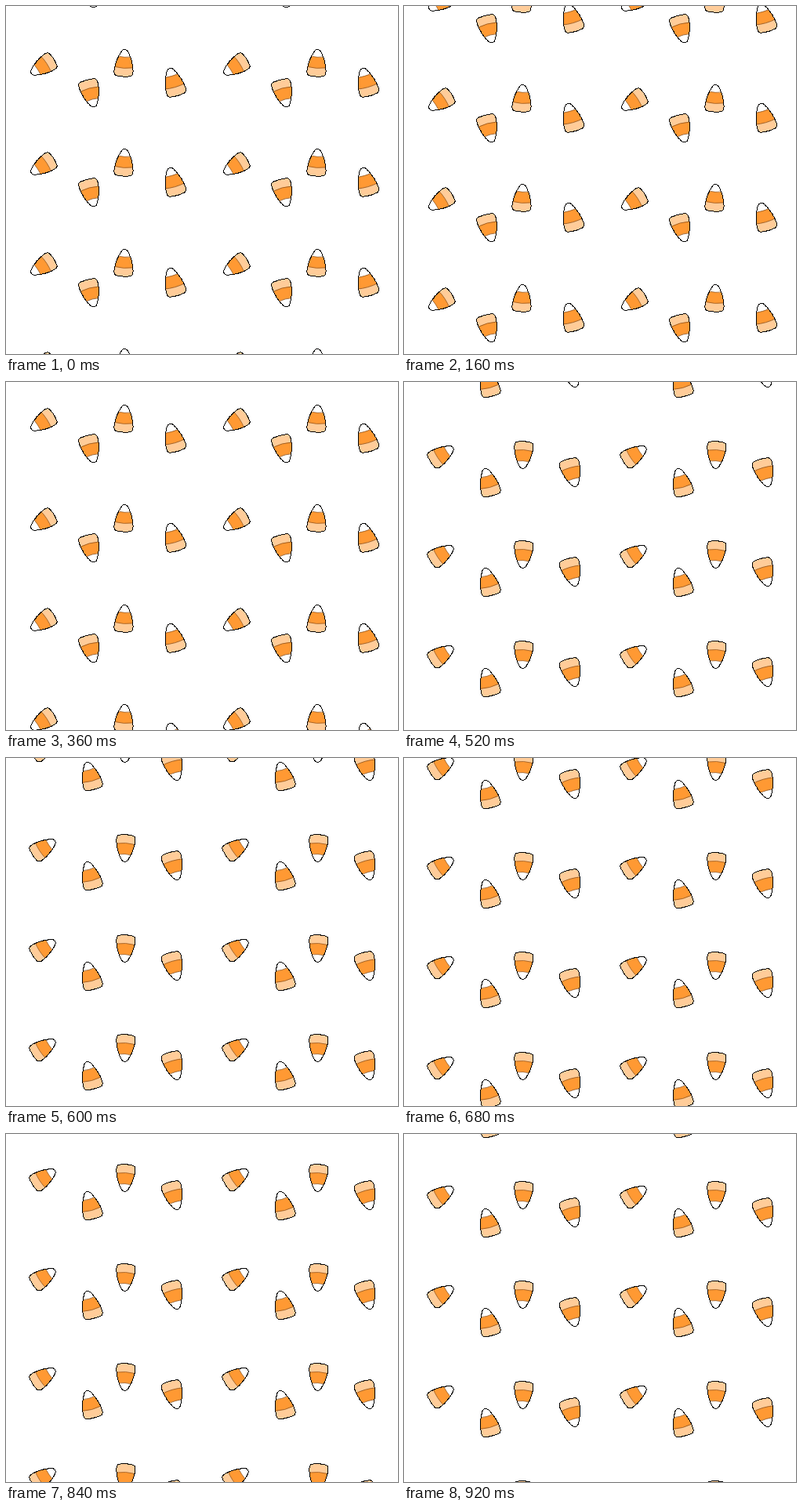
Recreate the animation shown at these times as an HTML page with a canvas. Size 500 by 444 pixels, loop 0.96 s.

```html
<!DOCTYPE html>
<html lang="en">
<head>
<meta charset="utf-8">
<title>Falling candy corn</title>
<style>
html, body { margin: 0; width: 100%; height: 100%; overflow: hidden; background: #fff; }
canvas { display: block; }
</style>
</head>
<body>
<canvas id="stage" width="500" height="444"></canvas>
<script>
const ctx = document.getElementById("stage").getContext("2d");
const WIDTH = 500, HEIGHT = 444;
const STEP_MS = 40, STEPS = 24, FLIP_STEP = 12;
const FALL = 11.25, TILE_X = 246, TILE_Y = 382 / 3;

// Each candy has an upright pose and a slightly displaced half-turned one.
const candies = [
  { x: 46.9, y: 76.7, turn: -123, scale: 0.98, dx: 1.1, dy: -2.6 },
  { x: 107.9, y: 111.1, turn: 165, scale: 1.03, dx: 0, dy: -1.8 },
  { x: 150.6, y: 73.2, turn: 3.5, scale: 1, dx: 1.7, dy: 0.5 },
  { x: 213.8, y: 97.4, turn: -16, scale: 1.05, dx: 0.1, dy: -0.9 }
];

const outline =
  "M-5-13.5C-3-19 3-19 5-13.5C8.8-7 11.3 1 12 9" +
  "C12.3 14 11 15.8 8 16.2Q0 17.6-8 16.2" +
  "C-11 15.8-12.3 14-12 9C-11.3 1-8.8-7-5-13.5Z";
const body = new Path2D(outline);
const rim = samplePath(outline, 0.8);

const bandEdge = y => `M-14 ${y - 1}Q0 ${y + 2} 14 ${y - 1}`;
const band = (y, color) => ({
  color,
  area: new Path2D(bandEdge(y) + "V-22H-14Z"),
  edge: new Path2D(bandEdge(y))
});
const bands = [band(5.7, "#ff9933"), band(-8.4, "#ffffff")];

function samplePath(d, spacing) {
  const path = document.createElementNS("http://www.w3.org/2000/svg", "path");
  path.setAttribute("d", d);
  const count = Math.ceil(path.getTotalLength() / spacing);
  return Array.from({ length: count }, (_, i) => path.getPointAtLength(i * spacing));
}

// Crisp one-pixel outline without smoothing.
function drawRim(x, y, angle, scale) {
  const cos = Math.cos(angle) * scale, sin = Math.sin(angle) * scale;
  ctx.fillStyle = "#000";
  for (const p of rim) {
    const px = Math.floor(x + p.x * cos - p.y * sin);
    const py = Math.floor(y + p.x * sin + p.y * cos);
    ctx.fillRect(px, py, 1, 1);
  }
}

function drawCandy(x, y, turn, scale) {
  const angle = turn * Math.PI / 180;
  ctx.save();
  ctx.translate(x, y);
  ctx.rotate(angle);
  ctx.scale(scale, scale);
  ctx.fillStyle = "#ffcc99";
  ctx.fill(body);
  ctx.clip(body);
  ctx.lineWidth = 0.7;
  ctx.strokeStyle = "#8a4f1a";
  for (const { color, area, edge } of bands) {
    ctx.fillStyle = color;
    ctx.fill(area);
    ctx.stroke(edge);
  }
  ctx.restore();
  drawRim(x, y, angle, scale);
}

function draw(time) {
  const step = Math.floor(time / STEP_MS) % STEPS;
  const flipped = step >= FLIP_STEP;
  const offset = (step * FALL) % TILE_Y;

  ctx.fillStyle = "#fff";
  ctx.fillRect(0, 0, WIDTH, HEIGHT);
  for (let row = -2; row < 4; row++) {
    const top = Math.round(offset + row * TILE_Y);
    for (let col = 0; col < 2; col++) {
      for (const c of candies) {
        const x = c.x + col * TILE_X + (flipped ? c.dx : 0);
        const y = c.y + top + (flipped ? c.dy : 0);
        drawCandy(x, y, c.turn + (flipped ? 180 : 0), c.scale);
      }
    }
  }
}

const start = performance.now();
function tick() {
  draw(performance.now() - start);
  requestAnimationFrame(tick);
}
tick();
</script>
</body>
</html>
```
